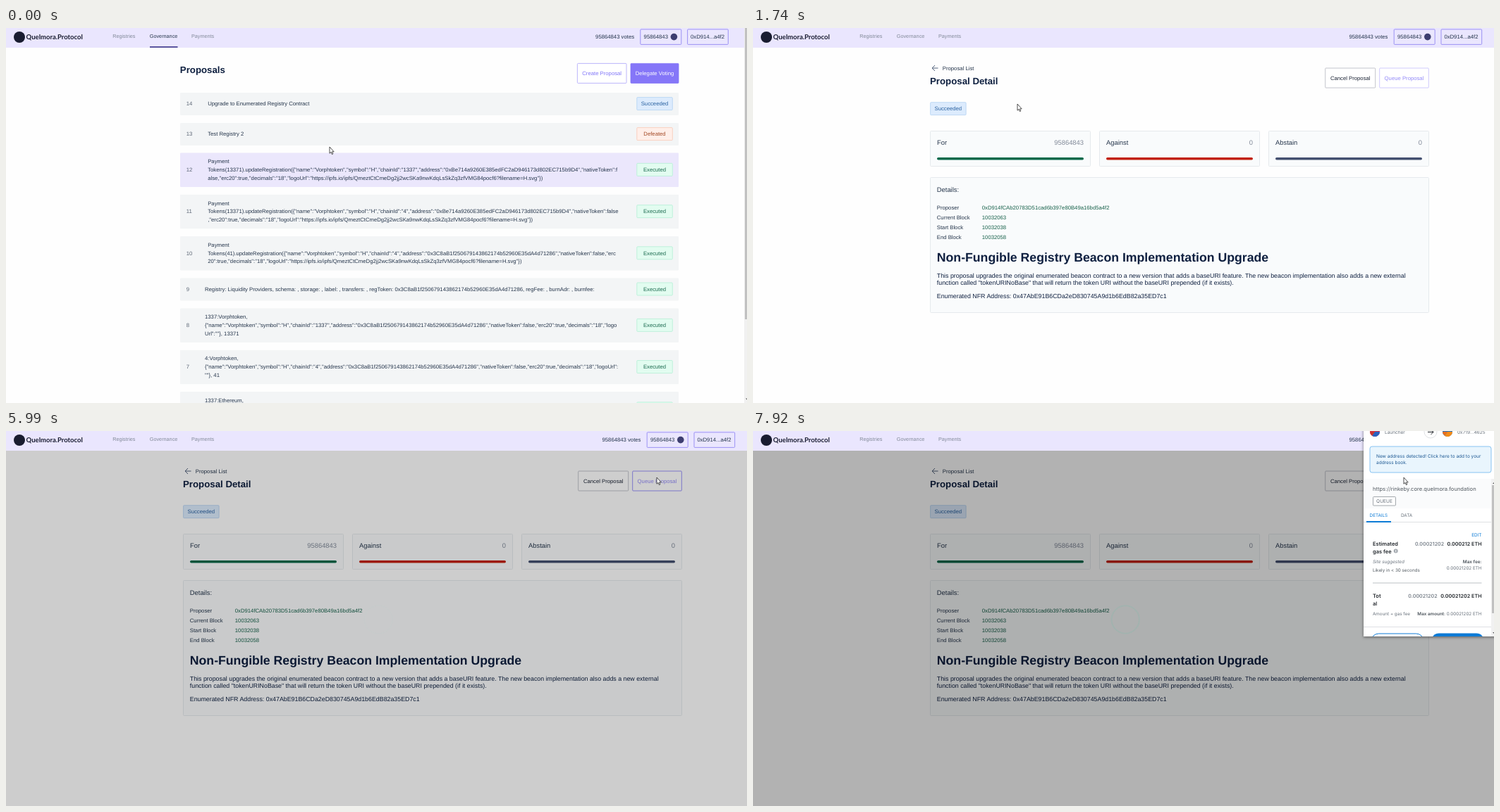
Recreate the animation shown at these times as an HTML page. Size 1051 by 533 pixels, loop 7.99 s.

```html
<!DOCTYPE html>
<html lang="en">
<head>
<meta charset="utf-8">
<title>Proposals</title>
<style>
html, body { margin: 0; width: 100%; height: 100%; overflow: hidden; background: #fefefe; }
svg { display: block; font-family: "Liberation Sans", Arial, sans-serif; text-rendering: geometricPrecision; }
.wallet { font-family: Inter, sans-serif; }
</style>
</head>
<body>
<svg id="stage" width="1051" height="533" viewBox="0 0 1051 533"></svg>
<script>
const LOOP = 7990, BODY = 7.735;
const NAVY = '#0f2040', INK = '#26364c', GREY = '#818998', VIOLET = '#8176f8', GREEN = '#17614a', BLUE = '#0d7bd6';
const WALLET = '0xD914fCAb20783D51cad6b397e80B49a16bd5a4f2';
const TOKEN_A = '0xBe714a9260E385edFC2aD946173d802EC715b9D4';
const TOKEN_B = '0x3C8aB1f250679143862174b52960E35dA4d71286';
const LOGO_URL = 'https://ipfs.io/ipfs/QmeztCtCmeDg2jj2wcSKa9nwKdqLsSkZq3zfVMG84pocf6?filename=H.svg';

// SVG helpers; text is placed by the middle of its capitals
const text = (s, x, mid, fill = INK, size = BODY, extra = '') =>
  `<text x="${x}" y="${mid + size * 0.358}" font-size="${size}" fill="${fill}" ${extra}>${s}</text>`;
const centred = (s, x, mid, fill, size) => text(s, x, mid, fill, size, 'text-anchor="middle"');
const right = (s, x, mid, fill, size, extra = '') => text(s, x, mid, fill, size, `text-anchor="end" ${extra}`);
const rect = (x, y, w, h, fill, stroke = 'none', r = 0, extra = '') =>
  `<rect x="${x}" y="${y}" width="${w}" height="${h}" rx="${r}" fill="${fill}" stroke="${stroke}" ${extra}/>`;
const line = (d, stroke, w = 1) => `<path d="${d}" fill="none" stroke="${stroke}" stroke-width="${w}"/>`;
const circle = (x, y, r, fill) => `<circle cx="${x}" cy="${y}" r="${r}" fill="${fill}"/>`;
const group = (id, body, extra = '') => `<g id="${id}" ${extra}>${body}</g>`;
const BOLD = 'font-weight="700"', SEMI = 'font-weight="600"';

const CHIPS = {
  Succeeded: ['#dcebfd', '#b3d2f3', '#2a62a0'],
  Defeated: ['#ffefe9', '#f9c8b5', '#a34a26'],
  Executed: ['#e2fcf0', '#b4efd6', '#1c6b50'],
};
const chip = (name, x, mid) => {
  const [fill, stroke, ink] = CHIPS[name];
  return rect(x, mid - 9, 50.5, 18, fill, stroke, 1, 'stroke-width=".8"') + centred(name, x + 25.2, mid, ink);
};
const button = (s, x, y, w, fill, stroke, ink, id = '') =>
  rect(x, y, w, 28, fill, stroke, 1, `stroke-width=".8" id="${id}"`) + centred(s, x + w / 2, y + 14, ink);

// Proposal list
const token = (chain, address) =>
  `{"name":"Vorphtoken","symbol":"H","chainId":"${chain}","address":"${address}","nativeToken":`;
const update = (id, chain, address, cut) => {
  const all = `Tokens(${id}).updateRegistration(${token(chain, address)}false,"erc20":true,"decimals":"18","logoUrl":"${LOGO_URL}"})`;
  const at = all.indexOf(cut) + cut.length;
  return ['Payment', all.slice(0, at), all.slice(at)];
};
const plain = '"erc20":true,"decimals":"18",';
const rows = [
  [14, 92, 'Succeeded', ['Upgrade to Enumerated Registry Contract']],
  [13, 135, 'Defeated', ['Test Registry 2']],
  [12, 177.5, 'Executed', update(13371, 1337, TOKEN_A, '"nativeToken":f')],
  [11, 236.8, 'Executed', update(13371, 4, TOKEN_A, '"nativeToken":false')],
  [10, 296, 'Executed', update(41, 4, TOKEN_B, ',"erc')],
  [9, 355.4, 'Executed', [`Registry: Liquidity Providers, schema: , storage: , label: , transfers: , regToken: ${TOKEN_B}, regFee: , burnAdr: , burnfee:`]],
  [8, 398.5, 'Executed', ['1337:Vorphtoken,', token(1337, TOKEN_B) + `false,${plain}"logo`, 'Url":""}, 13371']],
  [7, 457.7, 'Executed', ['4:Vorphtoken,', token(4, TOKEN_B) + `false,${plain}"logoUrl":`, '""}, 41']],
  [6, 517, 'Executed', ['1337:Ethereum,', '', '']],
];
const row = ([n, y, state, lines]) => {
  const h = lines.length > 1 ? 48.5 : 32, mid = y + h / 2 - 0.4, x = n > 9 ? 286.2 : 282;
  return rect(247, y, 707, h, '#f3f5f6', 'none', 1, `id="row${n}"`)
    + text(n, 255.8, mid, '#5c6675')
    + lines.map((s, i) => text(s, x, mid + (i - (lines.length - 1) / 2) * 11.85)).join('')
    + chip(state, 894.8, mid);
};
const list = group('list',
  text('Proposals', 246.8, 59.6, NAVY, 13.25, BOLD)
  + button('Create Proposal', 810.4, 50.4, 69.6, '#fff', '#aca4fa', VIOLET)
  + button('Delegate Voting', 886, 50.4, 68, '#8576f8', '#8576f8', '#fff')
  + rows.map(row).join(''));

// Proposal detail
const card = (name, x, color) => rect(x, 146.5, 227, 50, '#f9fbfc', '#e6eaed', 1)
  + text(name, x + 9.5, 162.8, INK, 9.4)
  + right('0', x + 217.5, 162.8, GREY, 9.4, `id="votes${name}"`)
  + rect(x + 9.5, 184, 208, 3.5, color, 'none', 1.7);
const fields = [['Proposer', WALLET], ['Current Block', '10032063'], ['Start Block', '10032038'], ['End Block', '10032058']];
const proposal = group('proposal',
  fields.map(([, v], i) => text(v, 324.8, 255.4 + i * 13.85, GREEN)).join('')
  + text('Non-Fungible Registry Beacon Implementation Upgrade', 260.8, 325.2, NAVY, 17.68, BOLD)
  + text('This proposal upgrades the original enumerated beacon contract to a new version that adds a baseURI feature. The new beacon implementation also adds a new external', 260.8, 352, NAVY, 8.83)
  + text('function called "tokenURINoBase" that will return the token URI without the baseURI prepended (if it exists).', 260.8, 362, NAVY, 8.83)
  + text('Enumerated NFR Address: 0x47AbE91B6CDa2eD830745A9d1b6EdB82a35ED7c1', 260.8, 380.6, NAVY, 8.83));
const detail = group('detail',
  line('M262.5 57H254.5M258 53L254 57L258 61', '#53627c', 1)
  + text('Proposal List', 268.8, 57.2, INK)
  + text('Proposal Detail', 251, 75, NAVY, 13.25, BOLD)
  + group('actions',
    button('Cancel Proposal', 811.7, 57, 71, '#fff', '#b3b5bf', '#1d2536')
    + button('Queue Proposal', 888.7, 57, 69.6, '#fff', '#c3bdfb', '#948bf8', 'queue')
    + chip('Succeeded', 251.6, 114.7))
  + group('lower',
    card('For', 251.5, '#05694a') + card('Against', 491.5, '#c2210d') + card('Abstain', 731.5, '#445070')
    + rect(251.5, 212.5, 707, 192, '#f9fbfc', '#e6eaed', 1, 'id="panel"')
    + text('Details:', 260.8, 229.2, INK, 9.4)
    + fields.map(([k], i) => text(k, 260.8, 255.4 + i * 13.85, INK)).join('')
    + proposal));

// Header
const header = rect(0, 0, 1051, 28, '#eae6fe')
  + circle(19, 13, 8, '#191c30')
  + text('Quelmora.Protocol', 28.6, 13, '#191c30', 9.5, `${BOLD} font-family="Lato, sans-serif"`)
  + text('Registries', 151.2, 11, GREY, 7.25)
  + text('Governance', 203.8, 11, GREY, 7.25, 'id="nav"')
  + text('Payments', 263, 11, GREY, 7.25)
  + rect(204, 26, 39.5, 2, '#5b559f', 'none', 0, 'id="tab"')
  + group('account',
    text('95864843 votes', 845.5, 12.6)
    + rect(909.2, 1.9, 58, 21.5, 'none', '#9388f2', 1, 'stroke-width=".9"')
    + text('95864843', 914, 12.6)
    + circle(956.8, 12.6, 4.8, '#3d3e70')
    + rect(976, 1.9, 57.7, 21.5, 'none', '#9388f2', 1, 'stroke-width=".9"')
    + text(WALLET.slice(0, 6) + '...' + WALLET.slice(-4), 980.4, 12.6));
const scrollbar = group('bar',
  rect(1047, 0, 4, 533, '#f1f1f1') + rect(1048, 0, 3, 414, '#c1c1c1') + '<path d="M1049 526.5h2v2z" fill="#555"/>');

// Wallet popup
const avatar = (x, a, b, c) => circle(x, 1, 7, a)
  + `<path d="M${x} 1L${x + 7} 1A7 7 0 0 1 ${x - 4} 6.7z" fill="${b}"/><path d="M${x} 1L${x - 4} 6.7A7 7 0 0 1 ${x - 7} 1z" fill="${c}"/>`;
const LABEL = '#24292e', SOFT = '#6a737d';
const content = group('content',
  avatar(882, '#d93a4e', '#2b62c0', '#c8342f') + text('Launcher', 896, 1.5, SOFT, 6.5)
  + `<circle cx="961" cy="1" r="9" fill="#fff" stroke="#d6d9dc" stroke-width=".8"/>`
  + line('M957 1.5H965M961.5 -2L965 1.5L961.5 5', LABEL)
  + avatar(985, '#2677c9', '#f38b18', '#e96f1d') + text('0x719...4625', 999, 1.5, SOFT, 6.5)
  + rect(875, 22, 172, 37, '#e9f5fd', '#7cbdf0', 3, 'stroke-width=".9"')
  + text('New address detected! Click here to add to your', 884, 35.5, '#1f5a94', 6.5)
  + text('address book.', 884, 45, '#1f5a94', 6.5)
  + rect(866, 68, 181, 42, '#fafbfc')
  + text('https://rinkeby.core.quelmora.foundation', 879, 82, '#535a61', 7.6)
  + rect(879.5, 93.5, 32, 12.5, '#fff', '#8c9299', 1, 'stroke-width=".8"')
  + centred('QUEUE', 895.5, 99.6, SOFT, 6.6)
  + text('DETAILS', 874.6, 120, BLUE, 6.3) + text('DATA', 919, 120, SOFT, 6.3)
  + line('M866 129.5H1047', '#d6d9dc', .8) + rect(870, 128, 35, 2, BLUE)
  + right('EDIT', 1033.5, 147.5, BLUE, 6.4)
  + text('Estimated', 879, 160.5, LABEL, 7.5, SEMI) + text('gas fee', 879, 171, LABEL, 7.5, SEMI)
  + circle(911.7, 170.5, 3, '#a6abb1') + rect(911.3, 169, .9, 3.2, '#fff')
  + right('0.00021202', 980.2, 160.5, SOFT, 7.2, 'font-weight="500"')
  + right('0.000212 ETH', 1033.5, 160.5, LABEL, 7.2, SEMI)
  + text('Site suggested', 879, 185.7, SOFT, 6.4, 'font-style="italic"')
  + right('Max fee:', 1033.5, 185.7, '#4a525a', 6.4, SEMI)
  + text('Likely in &lt; 30 seconds', 879, 197.3, '#535a61', 6.3)
  + right('0.00021202 ETH', 1033.5, 195, SOFT, 6.3)
  + line('M879 216H1033.5', '#bbc0c5')
  + text('Tot', 879, 234.5, LABEL, 7.5, SEMI) + text('al', 879, 245, LABEL, 7.5, SEMI)
  + right('0.00021202', 970.6, 234.5, SOFT, 7.2, 'font-weight="500"')
  + right('0.00021202 ETH', 1033.5, 234.5, LABEL, 7.2, SEMI)
  + text('Amount + gas fee', 879, 259.7, SOFT, 6.3)
  + right(`<tspan ${SEMI} fill="#4a525a">Max amount:</tspan> 0.00021202 ETH`, 1033.5, 259.7, SOFT, 6.3)
  + line('M866 278.5H1047', '#d6d9dc', .8)
  + rect(876.5, 288, 75, 22, '#fff', BLUE, 11) + rect(962, 287.5, 75, 22, BLUE, 'none', 11)
  + rect(1047, 68, 4, 224, '#f1f1f1') + rect(1048, 77, 3, 182, '#c1c1c1')
  + '<path d="M1049 75h2v-2zM1049 286h2v2z" fill="#555"/>');
const popup = group('popup',
  rect(866, -5, 200, 297, '#363636', 'none', 0, 'id="sheet" filter="url(#soft)"')
  + `<g class="wallet" clip-path="url(#frame)">${content}</g>`);

document.getElementById('stage').innerHTML =
  `<defs><clipPath id="frame">${rect(866, 0, 185, 292, '#fff')}</clipPath>
   <filter id="soft"><feDropShadow dx="0" dy="1" stdDeviation="2" flood-opacity=".5"/></filter></defs>`
  + rect(0, 0, 1051, 533, '#fefefe') + list + detail
  + group('shade', rect(0, 28, 1051, 505, '#000', 'none', 0, 'opacity=".302"')
    + '<circle id="ring" cx="528.2" cy="268" fill="none" stroke="#00cc99" stroke-width="2"/>')
  + header + scrollbar + popup
  + '<path id="cursor" d="M0 0V9.2L2 7.4L3.4 10.6L4.8 10L3.5 6.9H6.2z" fill="#fff" stroke="#222" stroke-width=".8"/>';

const el = id => document.getElementById(id);
const show = (id, on) => el(id).setAttribute('display', on ? 'inline' : 'none');
const set = (id, name, value) => el(id).setAttribute(name, value);
const ramp = (t, a, b) => Math.min(1, Math.max(0, (t - a) / (b - a)));

// Pointer: time, x, y
const path = [[0, 459, 169], [70, 457, 166], [490, 375, 108], [2850, 375, 108], [2960, 378, 143],
  [3500, 378, 143], [3970, 542, 130], [4340, 887, 127], [4790, 923, 66], [LOOP, 923, 66]];
function pointer(t) {
  const i = path.findIndex(k => k[0] > t), a = path[i - 1], b = path[i];
  const k = ramp(t, a[0], b[0]);
  return [a[1] + (b[1] - a[1]) * k, a[2] + (b[2] - a[2]) * k];
}

function draw(t) {
  const onList = t < 1280, loaded = t >= 1600;
  show('list', onList);
  show('bar', onList);
  show('tab', onList);
  show('detail', !onList);
  set('nav', 'fill', onList ? INK : GREY);
  set('account', 'transform', `translate(${onList ? -9.4 : 0} 0)`);

  const [x, y] = pointer(t);
  set('cursor', 'transform', `translate(${x} ${y})`);
  const hover = t < 70 ? 12 : y < 124 ? 14 : y > 135 && y < 167 ? 13 : 0;
  for (const n of [12, 13, 14]) set('row' + n, 'fill', n === hover ? '#ebe7fc' : '#f3f5f6');

  show('actions', loaded);
  show('proposal', loaded);
  set('lower', 'transform', `translate(0 ${loaded ? 0 : -40.8})`);
  set('panel', 'height', loaded ? 192 : 102);
  el('votesFor').textContent = loaded ? '95864843' : '0';
  set('queue', 'stroke', t > 4450 ? VIOLET : '#c3bdfb');

  // Loading backdrop with a ring that grows and fades
  const second = t > 3000;
  set('shade', 'opacity', second ? ramp(t, 5850, 6070) : ramp(t, 1250, 1400) * (1 - ramp(t, 1600, 1740)));
  const p = (t - (second ? 5150 : 759) + 1050) / 1050 % 1;
  set('ring', 'r', 1 + 19 * (1 - (1 - p) ** 4));
  set('ring', 'opacity', (1 - p) ** 2.6);

  show('popup', t >= 6590);
  show('content', t >= 7100);
  set('sheet', 'fill', t < 6870 ? '#363636' : '#fff');
  set('sheet', 'opacity', t < 6690 ? 0.95 : 1);
}

function tick(now) {
  draw(now % LOOP);
  requestAnimationFrame(tick);
}
draw(0);
requestAnimationFrame(tick);
</script>
</body>
</html>
```
